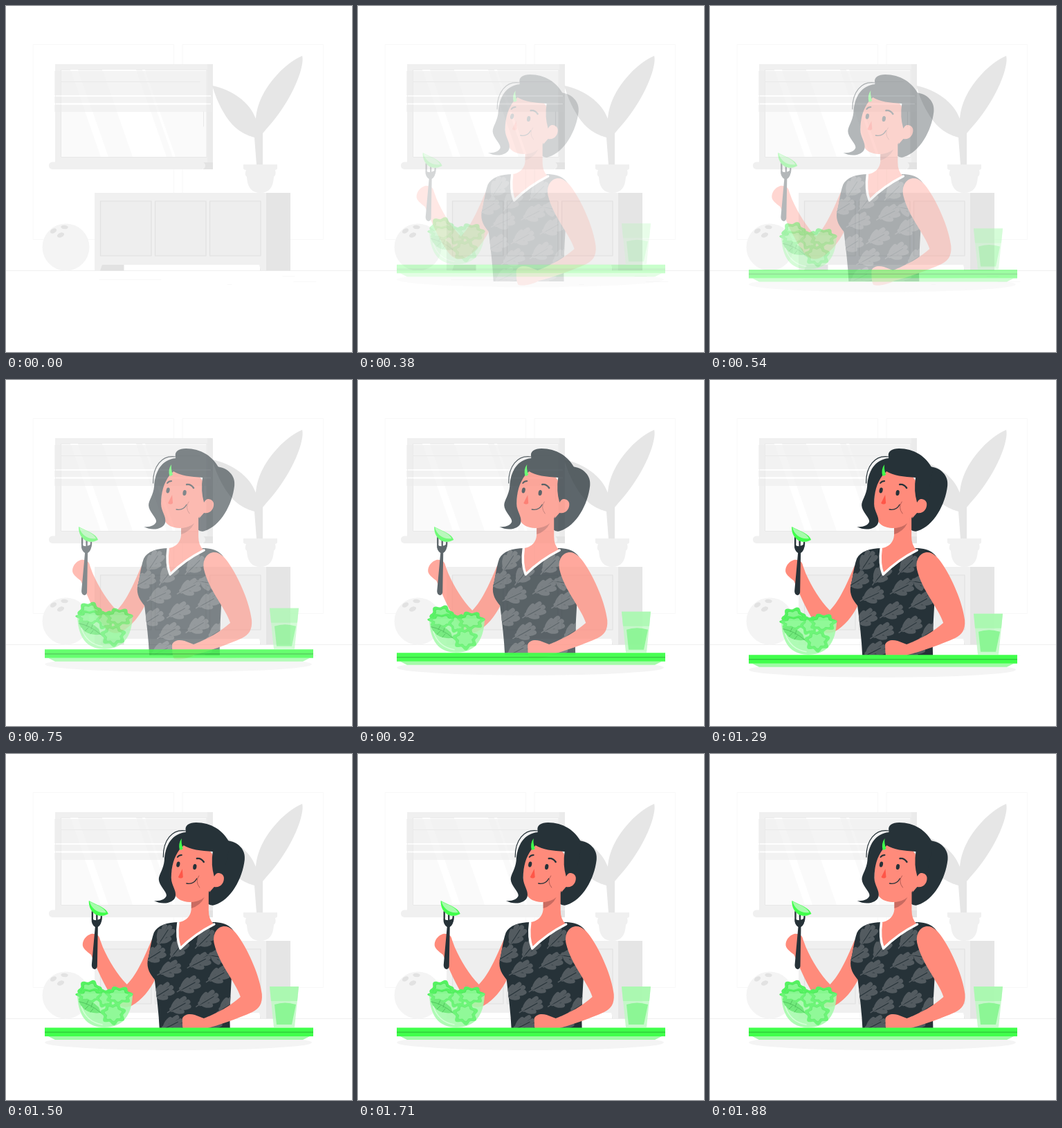
An HTML page that plays this animation: 500x500 px, repeating every 1.93 s.

```html
<!DOCTYPE html>
<html lang="en">
<head>
<meta charset="utf-8">
<title>Salad lunch</title>
<style>
html, body { margin: 0; width: 100%; height: 100%; overflow: hidden; background: #fff; }
svg { display: block; width: 100%; height: 100%; }
.line { fill: none; stroke-linecap: round; stroke-linejoin: round; }
</style>
</head>
<body>
<svg viewBox="0 0 500 500">
  <defs>
    <g id="oak" class="line">
      <path d="M-11 3Q2 2 14-3" stroke="#535b60" stroke-width="7"/>
      <path d="M-9 1Q-6-5 0-8M0 0Q3-7 10-9M-8 4Q-4 9 3 9M3 2Q8 6 14 4" stroke="#535b60" stroke-width="6.500"/>
      <path d="M-18 6Q-5 3 10-2" stroke="#263238" stroke-width="1"/>
      <path d="M-18 6L-10 3" stroke="#535b60" stroke-width="1.500"/>
    </g>
    <path id="dress" d="M248 243C231 243 217 248 212 258C207 272 206 288 203 298C201 310 207 319 213 326C216 350 219 375 220 398H322C321 370 323 345 324 325L331 270C331 253 319 243 297 243L250 282Z"/>
    <clipPath id="cloth"><use href="#dress"/></clipPath>
  </defs>

  <!-- room -->
  <g class="line" stroke="#f8f8f8">
    <path d="M39.500 55.500H242.500V337.500H39.500ZM255.500 55.500H458.500V337.500H255.500Z"/>
    <path d="M0 382.500H500" stroke="#f0f0f0"/>
    <path d="M135 395.500H224M400 390.500H417M416 398.500H448M320 402.500H326"/>
  </g>

  <!-- window -->
  <path d="M71 84H299V227H71Z" fill="#f0f0f0"/>
  <path d="M291 84H299V227H291Z" fill="#ebebeb"/>
  <path d="M79.500 92H290V218.500H79.500Z" fill="#fafafa" stroke="#e8e8e8"/>
  <path d="M93 92H104L148 218H137ZM139 92H188L232 218H183ZM197 92H201L245 218H241Z" fill="#fff"/>
  <g fill="#ededed" fill-opacity=".6">
    <path d="M70 94H292V104H70ZM70 104H292V129H70ZM70 131H298V140H70ZM70 143H298V153H70Z"/>
  </g>
  <path d="M72 130H296M72 141.500H296" stroke="#fff" stroke-width="1.500"/>
  <path d="M80 109.500H280M285.500 153V174" class="line" stroke="#e9e9e9"/>
  <path d="M285 226H299V236H285Z" fill="#e3e3e3"/>
  <rect x="62" y="225.500" width="226" height="10.500" rx="5" fill="#f0f0f0"/>

  <!-- plant -->
  <path d="M428 72C431 82 423 109 407 136C394 158 382 171 371 184V229H362L359 190C337 184 324 171 314 153C306 139 302 128 298 115C326 121 352 138 361 163C363 138 376 116 393 98C405 85 417 77 428 72Z" fill="#e6e6e6"/>
  <path d="M343 229H392V235Q391 237 389 237Q391 244 387 247Q386 270 367.500 270Q349 270 348 247Q344 244 347 237Q344 237 343 235Z" fill="#f0f0f0"/>

  <!-- cabinet -->
  <path d="M375 270H411V382.500H367V374Z" fill="#e5e5e5"/>
  <path d="M136 374H170.500V382.500H136Z" fill="#e2e2e2"/>
  <path d="M128 270H376V382.500H368L366 374H139L136 382.500H128Z" fill="#f0f0f0"/>
  <path d="M136.500 282H210V361H136.500ZM215.500 282H289V361H215.500ZM294.500 282H368V361H294.500Z" fill="#eee" stroke="#e2e2e2" stroke-width="1.200"/>

  <!-- ball -->
  <circle cx="86.500" cy="348.500" r="34" fill="#f4f4f4"/>
  <g fill="#e2e2e2">
    <ellipse cx="68.500" cy="325" rx="5" ry="3.200" transform="rotate(-28 68.500 325)"/>
    <ellipse cx="84.500" cy="319.500" rx="5.200" ry="2.800" transform="rotate(5 84.500 319.500)"/>
    <ellipse cx="79" cy="331" rx="5.300" ry="3.300" transform="rotate(-22 79 331)"/>
  </g>

  <g id="woman" opacity="0">
    <!-- far arm and back hair -->
    <path d="M109 274C110 267 115 262 121 260C128 259 133 262 134 268L138 279C147 299 159 319 173 333C188 318 199 291 209 268L214 325C206 341 194 356 181 363C170 369 160 365 152 352C139 333 130 310 121 290C115 285 108 281 109 274Z" fill="#ff8b7b"/>
    <path d="M316 125C334 126 345 139 343 153C340 180 323 211 300 218Q295 220 289 216L294 160Z" fill="#263238"/>

    <use href="#dress" fill="#263238"/>
    <g id="print" clip-path="url(#cloth)"></g>

    <!-- neck and face -->
    <path d="M266 207V222C266 237 255 242 248 243Q245 262 250 280L298 245Q291 239 291 226V195Z" fill="#ff8b7b"/>
    <path d="M247 244Q244 265 250 281Q271 260 299 246" class="line" stroke="#fff" stroke-width="3.500"/>
    <path d="M266 214Q278 213 285 207Q279 219 266 223Z" fill="#c96b61"/>
    <path d="M252 130C244 139 238 153 237 173C236 192 239 209 256 213C270 217 285 209 292 198L301 188L300 150L286 130Z" fill="#ff8b7b"/>
    <path d="M296 176C302 170 311 171 313 178C314 186 308 194 299 192L292 200Z" fill="#ff8b7b"/>

    <!-- hair -->
    <path d="M258 111C256 103 263 99 273 99C294 99 313 110 322 130L313 173C308 169 302 171 299 177Q294 160 297 141C280 140 264 138 255 132L249 138C241 149 237 162 237 179C237 190 245 197 243 206C241 215 225 219 212 212C221 213 228 210 230 205C231 199 219 190 219 181C219 174 226 166 227 154C228 132 238 115 258 113Z" fill="#263238"/>
    <path d="M258 111C238 108 225 125 225.500 149" class="line" stroke="#263238" stroke-width="1.200"/>
    <path d="M252 122Q251 129 254 137Q250 140 249 138Q247 129 252 122Z" fill="#40ff4b"/>

    <!-- features -->
    <g fill="#263238">
      <ellipse cx="247" cy="159.500" rx="2.500" ry="4" transform="rotate(12 247 159.500)"/>
      <ellipse cx="271" cy="163" rx="2.600" ry="4.100" transform="rotate(8 271 163)"/>
    </g>
    <g class="line" stroke="#263238">
      <path d="M274 151Q280 150 284 156" stroke-width="2.400"/>
      <path d="M246 149Q248 146 252 146" stroke-width="2"/>
      <path d="M259 187Q269 189 274 180" stroke-width="1.400"/>
    </g>
    <path d="M277 176Q271 184 278 193" class="line" stroke="#b65d55" stroke-width="1"/>
    <path d="M253 166L247 178Q251 181 254 178Z" fill="#ff5648"/>

    <!-- near arm -->
    <path d="M299 274C296 259 304 249 314 249C322 249 329 256 335 265C350 287 365 322 368 347C369 361 364 368 354 373C334 382 306 392 286 397C276 403 262 405 256 403C253 399 253 389 253 382C256 376 263 375 271 377L284 382C305 374 322 364 337 351C330 329 306 304 299 274Z" fill="#ff8b7b"/>

    <!-- fork and cucumber -->
    <path d="M123 228V238Q123 245 129 246Q136 246 136 235M129.500 231V246" class="line" stroke="#263238" stroke-width="2.300"/>
    <path d="M122 238Q129 243 136 237Q137 246 131 250L130 307Q129 311 126 311Q122 310 122 305L127 250Q121 246 122 238Z" fill="#263238"/>
    <path d="M118 212C117 226 129 240 146 231C143 222 131 219 118 212Z" fill="#40ff4b"/>
    <path d="M119 213C121 223 131 231 143 229C139 221 130 219 119 213Z" fill="#a6fbab"/>
  </g>

  <g id="table" opacity="0">
    <ellipse cx="249" cy="417" rx="193" ry="11" fill="#f4f4f4"/>
    <path d="M61 408H439L429 413H71Z" fill="#a0faa6"/>
    <path d="M56 395.500H444V408H56Z" fill="#40ff4b"/>
    <path d="M56 402H444" stroke="#2bb535" stroke-width="1.200"/>

    <!-- cup -->
    <path d="M381 336H423L417 395H387Z" fill="#c0fac5" fill-opacity=".85"/>
    <path d="M381 336H423L421 357H383Z" fill="#a3f8aa" fill-opacity=".75"/>
    <path d="M388 362Q403 357 419 362L413 391H391Z" fill="#8cf695"/>

    <!-- salad bowl -->
    <path id="bowl" d="M103 346C104 378 116 395 142 395C169 395 182 378 183 346Z" fill="#a6f9ac" fill-opacity=".85"/>
    <g id="salad"></g>
    <path d="M105 357Q117 350 134 366Q136 371 137 374Q113 377 105 357Z" fill="#5be267"/>
    <path d="M106 358Q122 361 137 374M116 362L119 356M123 366L125 360M119 364L114 369M126 368L122 373" class="line" stroke="#2aa838" stroke-width=".9"/>
    <path d="M103 346C104 378 116 395 142 395C169 395 182 378 183 346Z" fill="#a6fbad" fill-opacity=".3"/>
    <path d="M109 365Q116 387 139 391" class="line" stroke="#d4ffd8" stroke-width="1.500"/>
  </g>
</svg>

<script>
const $ = id => document.getElementById(id);

// x, y, tilt of each leaf on the dress
const leaves = [
  [226, 262, -40], [246, 281, -35], [234, 311, -8], [277, 300, -10],
  [262, 334, -12], [304, 320, -12], [224, 344, -15], [248, 364, -12],
  [289, 355, -14], [237, 391, -10], [285, 267, -28], [306, 292, 25],
  [212, 290, -15], [293, 390, -12], [319, 363, -15]
];
$("print").innerHTML = leaves.map(([x, y, a]) =>
  `<use href="#oak" transform="translate(${x} ${y}) rotate(${a})"/>`).join("");

// Closed wavy outline
function wavy(x, y, rx, ry, lobes, turn) {
  const points = Array.from({ length: 72 }, (_, i) => {
    const a = i / 72 * Math.PI * 2;
    const r = 0.88 + 0.12 * Math.cos(lobes * a + turn);
    return `${(x + rx * r * Math.cos(a)).toFixed(1)} ${(y + ry * r * Math.sin(a)).toFixed(1)}`;
  });
  return `M${points.join("L")}Z`;
}

// Lettuce leaf: bright rim, paler middle
function lettuce(x, y, rx, ry, lobes, turn) {
  return `<path d="${wavy(x, y, rx, ry, lobes, turn)}" fill="#55f261"/>
    <path d="${wavy(x, y, rx * 0.68, ry * 0.68, lobes, turn)}" fill="#86f78f" stroke="#3ddf4b" stroke-width=".7"/>`;
}
$("salad").innerHTML =
  lettuce(121, 341, 18, 15, 6, 1) +
  lettuce(122, 349, 22, 11, 7, 2) +
  lettuce(144, 353, 14, 15, 6, 0) +
  lettuce(163, 349, 21, 14, 7, 1) +
  lettuce(155, 375, 19, 17, 7, 2);

// Cubic Bezier easing (.36, -.01, .5, 1.38): eases in, overshoots, settles
function ease(x) {
  if (x >= 1) return 1;
  const curve = (s, a, b) => 3 * a * s * (1 - s) ** 2 + 3 * b * s * s * (1 - s) + s ** 3;
  let lo = 0, hi = 1;
  for (let i = 0; i < 24; i++) {
    const mid = (lo + hi) / 2;
    if (curve(mid, 0.36, 0.5) < x) lo = mid; else hi = mid;
  }
  return curve(lo, -0.01, 1.38);
}

const LOOP = 1930, STEP = 1000 / 24, SLIDE = 30;

function place(id, p, dx, dy) {
  const off = (p - 1) * SLIDE;
  $(id).setAttribute("transform", `translate(${off * dx} ${off * dy})`);
  $(id).setAttribute("opacity", Math.max(0, Math.min(1, p)));
}

const start = performance.now();
function draw() {
  const n = Math.min(45, Math.floor(((performance.now() - start) % LOOP + 5) / STEP));
  const t = n * STEP;
  const shown = n > 2;
  place("woman", shown ? ease((t + 80) / 2000) : 0, 1, 0);
  place("table", shown ? ease((t + 42) / 1500) : 0, 0, 1);
  requestAnimationFrame(draw);
}
draw();
</script>
</body>
</html>
```
